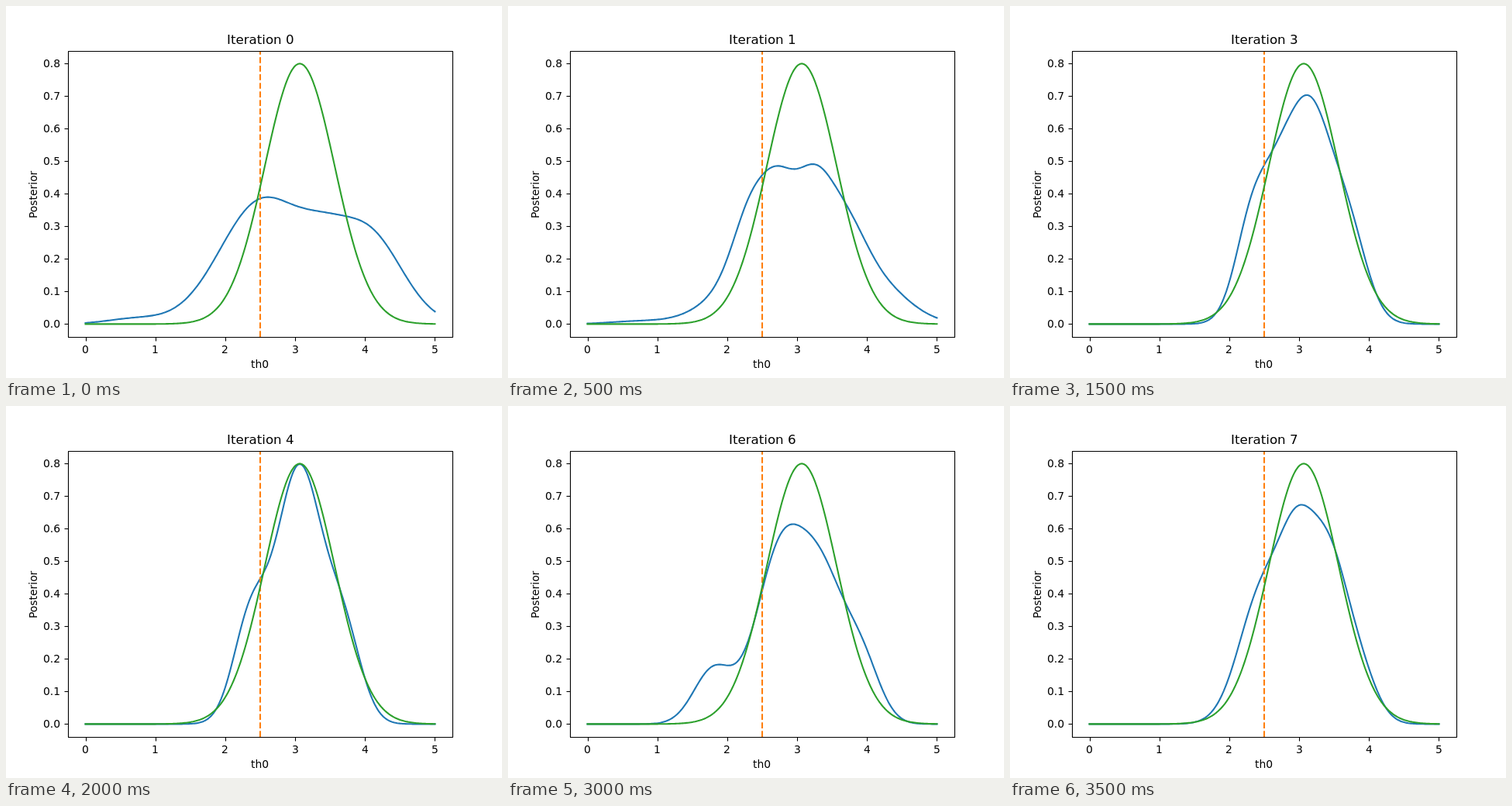
Recreate the animation shown at these times as an HTML page with a canvas. Size 640 px wide and 480 px high, loop 4 s.

```html
<!DOCTYPE html>
<html lang="en">
<head>
<meta charset="utf-8">
<title>Posterior</title>
<style>
  html, body { margin: 0; width: 100%; height: 100%; overflow: hidden; background: #fff; }
  canvas { display: block; }
</style>
</head>
<body>
<canvas id="plot" width="640" height="480"></canvas>
<script>
const ctx = document.getElementById('plot').getContext('2d');
const STEP_MS = 500;
const AXES = { left: 80.5, right: 576.5, top: 58.5, bottom: 427.5 };
const CENTER = 328;
const BASE = 410.4, PLOT_HEIGHT = 336;
const LINE = 2.083, THIN = 1.11, TICK = 5;

const bell = (mean, sd, height) => x => height * Math.exp(-((x - mean) ** 2) / (2 * sd * sd));
const sum = (...parts) => x => parts.reduce((total, f) => total + f(x), 0);
const average = (f, g) => x => (f(x) + g(x)) / 2;

const truth = bell(3.066, 0.5, 0.798);
const broad = sum(bell(0.7, 0.4, 0.016), bell(2.54, 0.61, 0.38), bell(3.38, 0.35, 0.095), bell(4.05, 0.48, 0.27));
const twin = sum(bell(2.35, 0.255, 0.37), bell(2.725, 0.218, 0.32), bell(3.23, 0.3, 0.57), bell(3.75, 0.27, 0.24));
const sharp = sum(bell(2.36, 0.25, 0.305), bell(3.06, 0.33, 0.78), bell(3.7, 0.253, 0.255));
const tall = sum(bell(2.3, 0.27, 0.148), bell(2.95, 0.34, 0.81), bell(3.57, 0.21, 0.295), bell(4.05, 0.19, 0.085));
const bump = sum(bell(1.8, 0.28, 0.165), bell(2.776, 0.36, 0.53), bell(3.39, 0.316, 0.371), bell(3.93, 0.26, 0.175));
const smooth = sum(bell(2.46, 0.33, 0.385), bell(3, 0.27, 0.49), bell(3.45, 0.25, 0.4), bell(3.85, 0.25, 0.16));

const iterations = [broad, average(broad, twin), twin, average(twin, sharp), sharp, tall, bump, smooth];

const samples = Array.from({ length: 251 }, (_, i) => i / 50);
const peakOf = f => Math.max(...samples.map(f), ...samples.map(truth));
const px = x => 102.545 + x * 90.182;
const snap = v => Math.floor(v + 0.5) + 0.5;

function stroke(color, width, points) {
  ctx.strokeStyle = color;
  ctx.lineWidth = width;
  ctx.beginPath();
  points.forEach(([x, y]) => ctx.lineTo(x, y));
  ctx.stroke();
}

// Text starts on a whole pixel; anchor is the share of its width left of x.
function label(text, x, y, anchor = 0.5, size = 13.889) {
  ctx.font = `${size}px "DejaVu Sans", sans-serif`;
  ctx.fillText(text, Math.round(x - ctx.measureText(text).width * anchor), y);
}

function drawAxes(peak, py) {
  ctx.lineCap = 'butt';
  ctx.fillStyle = '#000';
  for (let x = 0; x <= 5; x++) {
    const tx = snap(px(x));
    stroke('#000', THIN, [[tx, AXES.bottom], [tx, AXES.bottom + TICK]]);
    label(x, px(x), 448);
  }
  const tenths = peak > 0.8 ? 2 : 1;
  for (let n = 0; n <= 8; n += tenths) {
    const y = py(n / 10), ty = snap(y);
    stroke('#000', THIN, [[AXES.left, ty], [AXES.left - TICK, ty]]);
    label((n / 10).toFixed(1), 70.28, Math.round(y + 5), 1);
  }
  ctx.lineWidth = THIN;
  ctx.strokeRect(AXES.left, AXES.top, AXES.right - AXES.left, AXES.bottom - AXES.top);
}

function draw(index) {
  const peak = peakOf(iterations[index]);
  const py = v => BASE - v / peak * PLOT_HEIGHT;
  const curve = (f, color) => {
    ctx.lineCap = 'square';
    stroke(color, LINE, samples.map(x => [px(x), py(f(x))]));
  };

  ctx.fillStyle = '#fff';
  ctx.fillRect(0, 0, 640, 480);
  ctx.lineJoin = 'round';
  curve(iterations[index], '#1f77b4');

  ctx.lineCap = 'butt';
  ctx.setLineDash([LINE * 3.7, LINE * 1.6]);
  stroke('#ff7f0e', LINE, [[CENTER, 427], [CENTER, 58]]);
  ctx.setLineDash([]);

  curve(truth, '#2ca02c');
  drawAxes(peak, py);

  label('Iteration ' + index, CENTER, 49, 0.5, 16.667);
  label('th0', CENTER, 467);
  ctx.save();
  ctx.translate(40, 243);
  ctx.rotate(-Math.PI / 2);
  label('Posterior', 0, 0);
  ctx.restore();
}

const start = performance.now();
let shown = -1;
function tick() {
  const elapsed = performance.now() - start;
  const index = Math.floor(elapsed / STEP_MS) % iterations.length;
  if (index !== shown) draw(shown = index);
  requestAnimationFrame(tick);
}
tick();
</script>
</body>
</html>
```
